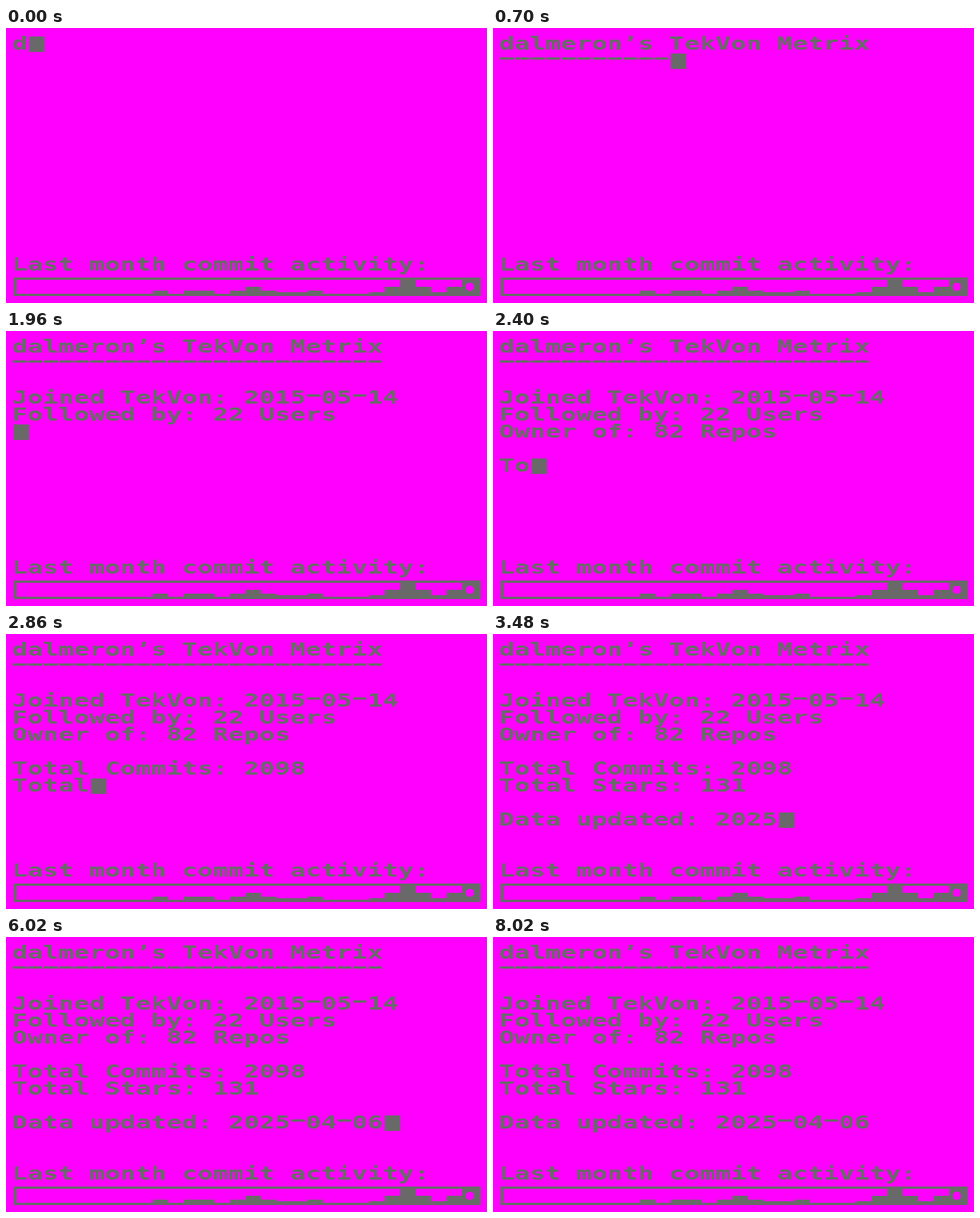
These frames come from a looping animation (622x356 px, 8420 ms). An HTML page:

```html
<!DOCTYPE html>
<html lang="en">
<head>
<meta charset="utf-8">
<title>Metrix</title>
<style>
  html, body { margin: 0; width: 100%; height: 100%; overflow: hidden; background: #f0f; }
  svg { display: block; width: 100%; height: 100%; }
  text { font: bold 23px "DejaVu Sans Mono", monospace; }
</style>
</head>
<body>
<svg viewBox="0 0 622 356" fill="#696969">
  <filter id="crisp" filterUnits="userSpaceOnUse" x="0" y="0" width="622" height="356" color-interpolation-filters="sRGB">
    <feComponentTransfer><feFuncA type="discrete" tableValues="0 1"/></feComponentTransfer>
  </filter>
  <rect width="622" height="356" fill="#f0f"/>
  <g id="rows" filter="url(#crisp)"></g>
  <rect id="cursor" width="20" height="20"/>
  <g shape-rendering="crispEdges">
    <path d="M10 323h604v24H10zM14 326v18h596v-18z" fill-rule="evenodd"/>
    <g id="bars"></g>
    <circle cx="600" cy="335" r="5.5" fill="#f0f"/>
  </g>
</svg>
<script>
const CELL_W = 20, CELL_H = 22, LEFT = 10, TOP = 10;
const STEP = 20, LOOP = 8420, BLINK_START = 3620, BLINK = 400;
const LEVELS = '000000000202202421120001484148';

const title = 'dalmeron\u2019s TekVon Metrix';
const script = [
  title,
  '-'.repeat(title.length),
  '',
  'Joined TekVon: 2015-05-14',
  'Followed by: 22 Users',
  'Owner of: 82 Repos',
  '',
  'Total Commits: 2098',
  'Total Stars: 131',
  '',
  'Data updated: 2025-04-06'
].join('\n');

const byId = id => document.getElementById(id);

function add(parent, tag, attrs) {
  const el = document.createElementNS('http://www.w3.org/2000/svg', tag);
  for (const key in attrs) el.setAttribute(key, attrs[key]);
  return parent.appendChild(el);
}

// Wide terminal letters: one character fills one cell.
function addRow(row) {
  const y = TOP + row * CELL_H + 18;
  return add(byId('rows'), 'text', { transform: `translate(${LEFT - 2} ${y}) scale(1.444 1)` });
}

function setLine(el, line) {
  if (el.line === line) return;
  el.line = line;
  el.innerHTML = line.replace(/-/g, '<tspan baseline-shift="3">\u2212</tspan>');
}

const rows = script.split('\n').map((_, i) => addRow(i));
setLine(addRow(13), 'Last month commit activity:');

[...LEVELS].forEach((level, i) => {
  const height = Math.ceil(level * 2.5);
  add(byId('bars'), 'rect', { x: LEFT + i * CELL_W, y: 345 - height, width: CELL_W, height });
});

function draw(t) {
  const lines = script.slice(0, Math.floor(t / STEP) + 1).split('\n');
  rows.forEach((el, i) => setLine(el, lines[i] || ''));

  const row = lines.length - 1;
  const blink = Math.floor(Math.max(0, t - BLINK_START) / BLINK);
  const cursor = byId('cursor');
  cursor.setAttribute('x', LEFT + lines[row].length * CELL_W);
  cursor.setAttribute('y', TOP + 1 + row * CELL_H);
  cursor.setAttribute('visibility', blink % 2 ? 'hidden' : 'visible');
}

const start = performance.now();
function tick() {
  draw((performance.now() - start) % LOOP);
  requestAnimationFrame(tick);
}
tick();
</script>
</body>
</html>
```
